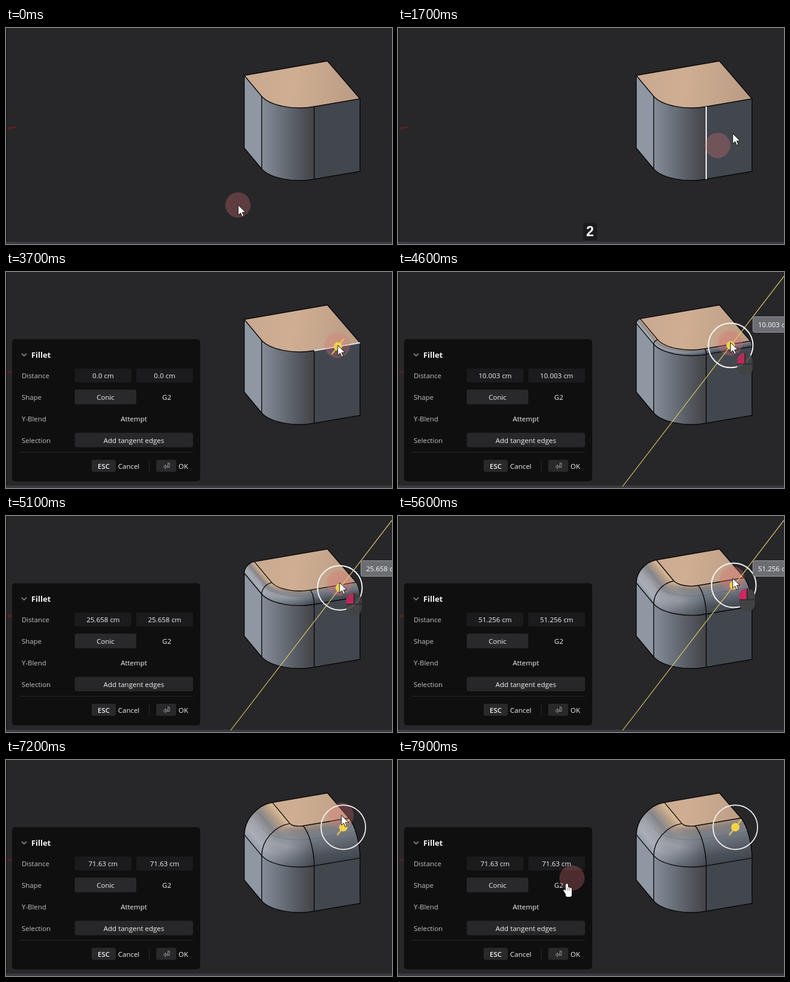
Write an HTML page with a canvas that moves like this. It is 640 by 360 pixels and loops after 8 s.

```html
<!DOCTYPE html>
<html lang="en">
<head>
<meta charset="utf-8">
<title>Fillet tool</title>
<style>
html, body { margin: 0; width: 100%; height: 100%; overflow: hidden; background: #27272a; }
canvas { display: block; width: 640px; height: 360px; }
</style>
</head>
<body>
<canvas id="stage" width="640" height="360"></canvas>
<script>
const ctx = document.getElementById('stage').getContext('2d');
const LOOP = 8000, STEP = 100, TRAIL = 65;
const FONT = '"Open Sans", "Noto Sans", sans-serif';

const clamp = v => Math.max(0, Math.min(1, v));
const between = (t, a, b) => t >= a && t < b;

// Monotone cubic interpolation through [time, value] keys.
function track(keys) {
  const slope = i => (keys[i + 1][1] - keys[i][1]) / (keys[i + 1][0] - keys[i][0]);
  const tangents = keys.map((_, i) => {
    if (i === 0 || i === keys.length - 1) return 0;
    const a = slope(i - 1), b = slope(i);
    return a * b > 0 ? 2 * a * b / (a + b) : 0;
  });
  return t => {
    if (t <= keys[0][0]) return keys[0][1];
    const i = keys.findIndex(k => k[0] >= t) - 1;
    if (i < 0) return keys[keys.length - 1][1];
    const h = keys[i + 1][0] - keys[i][0], s = (t - keys[i][0]) / h, r = 1 - s;
    return r * r * (1 + 2 * s) * keys[i][1] + s * s * (3 - 2 * s) * keys[i + 1][1]
      + h * s * r * (r * tangents[i] - s * tangents[i + 1]);
  };
}

const pointer = [
  [0, 385, 295], [1330, 385, 295], [1500, 450, 253], [1700, 555, 176], [1850, 569, 160],
  [2200, 557, 133], [2300, 553, 132], [2900, 553, 132], [3300, 550, 122], [4000, 550, 122],
  [5100, 553, 111], [6100, 556, 96], [6400, 556, 93], [7250, 556, 92], [7500, 470, 122],
  [7700, 345, 158], [7800, 297, 189], [7900, 280, 206], [8000, 276, 210]
];
const pointerX = track(pointer.map(([t, x]) => [t, x]));
const pointerY = track(pointer.map(([t, , y]) => [t, y]));
const distance = track([[4000, 0], [5100, 25.658], [6100, 70.668], [6400, 71.63]]);

// Basic drawing helpers
function box(x, y, w, h, r, fill) {
  ctx.beginPath();
  ctx.roundRect(x, y, w, h, r);
  ctx.fillStyle = fill;
  ctx.fill();
}
function line(points, color, width) {
  ctx.beginPath();
  points.forEach(([x, y]) => ctx.lineTo(x, y));
  ctx.strokeStyle = color;
  ctx.lineWidth = width;
  ctx.stroke();
}
function disc(x, y, r, fill) {
  ctx.beginPath();
  ctx.arc(x, y, r, 0, 7);
  ctx.fillStyle = fill;
  ctx.fill();
}
function text(str, x, y, { color = '#f4f4f4', align = 'center', font = '500 11.5px ' + FONT } = {}) {
  ctx.font = font;
  ctx.textAlign = align;
  ctx.fillStyle = color;
  ctx.fillText(str, x, y);
}

// Solid: an extruded square with one rounded corner, in parallel projection.
const A = [395, 79], B = [533, 55], C = [587, 118], D = [511, 131], E = [424, 114];
const U = [138, -24], V = [54, 63], CORNER = [449, 142];
const HEIGHT = 121, SIZE = 212, DROP = 0.633, K = 0.5523;
const add = (p, q, k = 1) => [p[0] + q[0] * k, p[1] + q[1] * k];
const down = (p, d) => [p[0], p[1] + d];
const toward = (p, q, k) => [p[0] + (q[0] - p[0]) * k, p[1] + (q[1] - p[1]) * k];
const curveTo = (c1, c2, p) => ctx.bezierCurveTo(...c1, ...c2, ...p);

// Front rim, moved inwards by a fraction of the side and down by some pixels.
function rim(inset, drop) {
  const [a, e] = [A, E].map(p => down(add(p, U, inset), drop));
  const [d, c] = [D, C].map(p => down(add(p, V, -inset), drop));
  const k = down(add(add(CORNER, U, inset), V, -inset), drop);
  return { a, e, d, c, k };
}
function traceRim(r, start = r.a) {
  ctx.beginPath();
  ctx.moveTo(...start);
  ctx.lineTo(...r.e);
  curveTo(toward(r.e, r.k, K), toward(r.d, r.k, K), r.d);
  ctx.lineTo(...r.c);
}
function strokeEdge(color = '#08080a', width = 1.4) {
  ctx.strokeStyle = color;
  ctx.lineWidth = width;
  ctx.stroke();
}
function gradient(x0, y0, x1, y1, stops) {
  const g = ctx.createLinearGradient(x0, y0, x1, y1);
  stops.forEach(([at, color]) => g.addColorStop(at, color));
  return g;
}
const channels = hex => [1, 3, 5].map(i => parseInt(hex.slice(i, i + 2), 16));
function ramp(colors, t) {
  const pos = t * (colors.length - 1), i = Math.min(Math.floor(pos), colors.length - 2);
  const a = channels(colors[i]), b = channels(colors[i + 1]);
  return `rgb(${a.map((v, n) => v + (b[n] - v) * (pos - i))})`;
}
const LEFT = ['#969ea8', '#a9adb6', '#a0a3aa', '#85868b', '#b89f88', '#e3c298'];
const MIDDLE = ['#666d76', '#7d848d', '#959aa3', '#8b8f96', '#8b8784', '#bfa185'];
const RIGHT = ['#43484f', '#4d535b', '#626973', '#757c86', '#85807f', '#b4967c'];

function drawSolid(dist, hover) {
  const inset = dist / SIZE, drop = dist * DROP;
  const base = rim(0, HEIGHT), low = rim(0, drop), top = rim(inset, 0);
  ctx.lineJoin = 'round';

  traceRim(base);
  [low.c, B, low.a].forEach(p => ctx.lineTo(...p));
  ctx.fillStyle = gradient(E[0], 0, D[0], 0, [
    [0, '#8f98a2'], [0.01, '#848c97'], [0.35, '#6c737d'], [0.7, '#54585f'],
    [0.97, '#454549'], [1, '#42474e']
  ]);
  ctx.fill();

  if (dist > 0) {
    for (let i = 0; i <= 30; i++) {
      const t = i / 30, angle = t * Math.PI / 2;
      const r = rim(inset * (1 - Math.cos(angle)), drop * (1 - Math.sin(angle)));
      traceRim(r);
      ctx.lineTo(...B);
      ctx.fillStyle = gradient(r.e[0], 0, r.d[0], 0, [
        [0, ramp(LEFT, t)], [0.45, ramp(MIDDLE, t)], [1, ramp(RIGHT, t)]
      ]);
      ctx.fill();
    }
    traceRim(rim(0, 0), E);
    strokeEdge('rgba(40,46,56,.18)', 1);
  }

  traceRim(top);
  ctx.lineTo(...B);
  ctx.closePath();
  ctx.fillStyle = gradient(395, 80, 575, 110, [[0, '#c8a88f'], [0.45, '#cfae93'], [1, '#bc9d84']]);
  ctx.fill();
  strokeEdge();

  traceRim(base);
  strokeEdge();
  if (dist > 0) {
    traceRim(low);
    strokeEdge();
  }
  [[A, 'a'], [E, 'e'], [D, 'd'], [C, 'c']].forEach(([p, key]) => {
    ctx.beginPath();
    ctx.moveTo(...base[key]);
    ctx.lineTo(...low[key]);
    curveTo(toward(low[key], p, K), toward(top[key], p, K), top[key]);
    strokeEdge();
  });
  if (hover === 'side') line([D, base.d], '#f4f4f4', 2);
  if (hover === 'top') line([D, C], '#e9eceb', 2);
}

// Distance handle
function drawHandle(t, dist, dragging) {
  const k = dist / 72;
  const x = 550.3 + 9 * k, y = 124 - 12 * k;
  if (dragging) line([[372.3, 357.5], [640.3, 6.7]], '#e6d268', 1.1);
  else line([[x - 10, y + 13], [x + 10, y - 13]], '#f0cf45', 2);
  disc(x, y, 7, '#f3d24a');
  if (t >= 3900) {
    ctx.beginPath();
    ctx.arc(x, y, 37, 0, 7);
    strokeEdge('#f5f5f5', dragging ? 2 : 1.7);
  }
}

function format(dist) {
  const s = String(+dist.toFixed(3));
  return (s.includes('.') ? s : s + '.0') + ' cm';
}

function drawTooltip(dist) {
  box(588.5, 74.5, 80, 26, 3, '#6d6e73');
  strokeEdge('#97989d', 1);
  text(format(dist), 597, 92, { align: 'left', color: '#fff' });
}

function drawPanel(t, dist) {
  const show = clamp((t - 2850) / 250);
  if (!show) return;
  ctx.save();
  ctx.globalAlpha = show;
  ctx.translate(-5 * (1 - show), -10 * (1 - show));
  box(10, 112, 312, 237, 5, '#0f0f10');
  line([[26, 136], [30, 140], [34, 136]], '#a5a5a7', 1.2);
  text('Fillet', 42, 143, { align: 'left', font: 'bold 12.9px ' + FONT });
  ['Distance', 'Shape', 'Y-Blend', 'Selection'].forEach((label, i) =>
    text(label, 26, 177 + 36 * i, { align: 'left', color: '#c3c3c5', font: '11.4px ' + FONT }));
  [114, 216].forEach(x => {
    box(x, 161, 94, 23, 2, '#1b1b1d');
    text(format(dist), x + 47, 177);
  });
  box(114, 196, 102, 24.5, 3, '#29292b');
  text('Conic', 165, 213);
  text('G2', 266.5, 213);
  text('Attempt', 212, 249);
  box(114, 268, 196, 24, 3, '#272729');
  text('Add tangent edges', 212, 285);
  line([[22, 300.5], [310, 300.5]], '#272729', 1);
  box(142, 313, 40, 20, 3, '#29292b');
  text('ESC', 162, 328, { font: '600 11.4px ' + FONT });
  text('Cancel', 203.5, 328);
  line([[237.5, 313], [237.5, 333]], '#272729', 1);
  box(249, 313, 33, 20, 3, '#29292b');
  line([
    [261, 324.5], [264.5, 321.5], [264.5, 323.5], [268.5, 323.5], [268.5, 318.5],
    [271, 318.5], [271, 325.5], [264.5, 325.5], [264.5, 327.5], [261, 324.5]
  ], '#b4b4b6', 0.8);
  text('OK', 294, 328);
  ctx.restore();
}

function drawMouse(x, y, alpha) {
  ctx.save();
  ctx.globalAlpha = alpha;
  box(x - 13, y - 19, 26, 38, 13, '#414243');
  ctx.clip();
  ctx.fillStyle = '#d0265f';
  ctx.fillRect(x - 13, y - 19, 13, 18);
  line([[x, y - 19], [x, y - 1]], '#29292b', 2);
  line([[x - 13, y - 0.5], [x + 13, y - 0.5]], '#29292b', 1.4);
  ctx.restore();
}

function drawArrow(x, y) {
  ctx.beginPath();
  [[0, 0], [0, 17], [4, 13.3], [6.7, 19.5], [9.3, 18.3], [6.7, 12.3], [12, 12]]
    .forEach(([dx, dy]) => ctx.lineTo(x + dx, y + dy));
  ctx.closePath();
  ctx.fillStyle = '#fff';
  ctx.fill();
  strokeEdge('#111', 1);
}

function drawHand(x, y) {
  ctx.beginPath();
  ctx.roundRect(x - 2, y, 4, 15, 2);
  ctx.roundRect(x + 1.5, y + 6, 3.6, 9, 1.8);
  ctx.roundRect(x + 4.5, y + 7, 3.5, 9, 1.7);
  ctx.roundRect(x - 2, y + 10, 10, 12, [0, 0, 3, 3]);
  ctx.moveTo(x - 6, y + 11);
  ctx.lineTo(x - 3.5, y + 10);
  ctx.lineTo(x - 1, y + 13);
  ctx.lineTo(x, y + 21);
  ctx.closePath();
  strokeEdge('#111', 1.6);
  ctx.fillStyle = '#fff';
  ctx.fill();
  [1.8, 4.8].forEach(dx => line([[x + dx, y + 7], [x + dx, y + 12]], '#333', 0.7));
}

function drawHalo(t, pressed) {
  const x = pointerX(t - TRAIL), y = pointerY(t - TRAIL);
  disc(x - 0.5, y, 21, 'rgba(222,112,116,.3)');
  if (!pressed) return;
  for (let r = 5; r < 20; r += 3) {
    ctx.beginPath();
    ctx.arc(x, y, r, 0, 7);
    strokeEdge('rgba(215,80,90,.2)', 1);
  }
}

function drawPointer(t, pressed) {
  const x = pointerX(t), y = pointerY(t);
  if (x < 322) drawHand(x, y);
  else drawArrow(x, y);
  if (pressed) drawMouse(x + 24, y + 36.5, t < 5500 ? 0.85 : 1);
}

function drawStage(t) {
  const dist = distance(t);
  const dragging = between(t, 3900, 6800);
  const pressed = dragging || between(t, 2600, 2900);
  const hover = between(t, 1650, 1850) ? 'side' : between(t, 2000, 4050) ? 'top' : '';

  ctx.fillStyle = '#27272a';
  ctx.fillRect(0, 0, 640, 360);
  line([[2, 167.5], [17, 165]], '#5c2024', 3);
  line([[1, 0], [1, 356]], '#1b1b1e', 1.5);
  ctx.fillStyle = '#3b3a41';
  ctx.fillRect(0, 356, 640, 4);

  drawSolid(dist, hover);
  drawPanel(t, dist);
  drawHalo(t, pressed);
  if (t >= 3000) drawHandle(t, dist, dragging);
  if (dragging) drawTooltip(dist);
  if (between(t, 700, 2000)) {
    box(307, 325, 23, 29, 2, '#1b1b1d');
    text('2', 318.3, 347, { color: '#fff', font: 'bold 23px "Liberation Sans", Arial, sans-serif' });
  }
  drawPointer(t, pressed);
}

const began = performance.now();
function tick() {
  const t = (performance.now() - began) % LOOP;
  drawStage(Math.floor(t / STEP) * STEP);
  requestAnimationFrame(tick);
}
tick();
</script>
</body>
</html>
```
